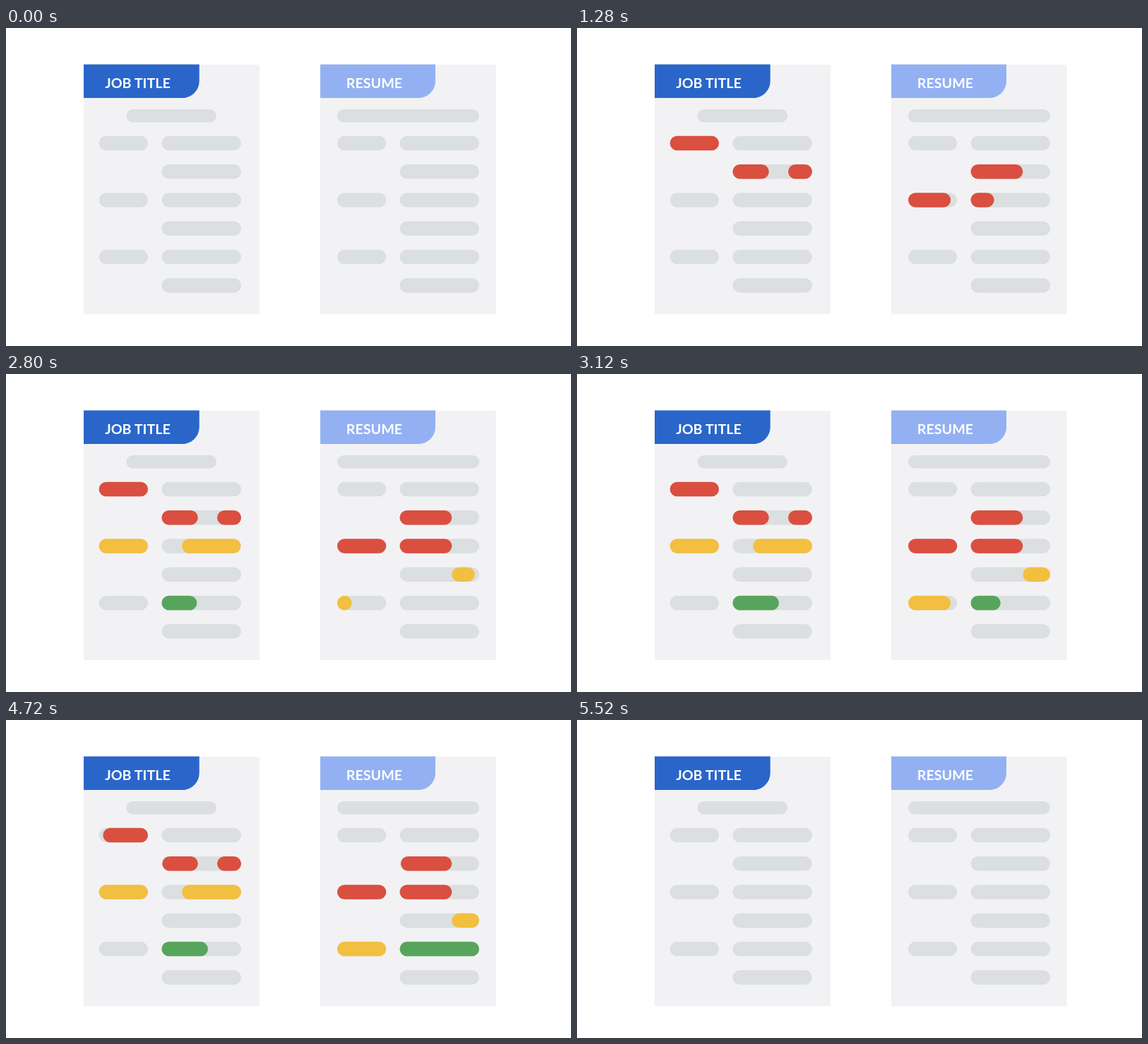
These frames come from a looping animation (800x450 px, 5760 ms). An HTML page:

```html
<!DOCTYPE html>
<html lang="en">
<head>
<meta charset="utf-8">
<title>Job title and resume</title>
<style>
  html, body { margin: 0; width: 100%; height: 100%; overflow: hidden; background: #fff; }
  svg { display: block; width: 100%; height: 100%; }
  text { font: 700 19.7px Lato, "Open Sans", sans-serif; fill: #fff; text-anchor: middle; }
</style>
</head>
<body>
<svg id="stage" viewBox="0 0 800 450"></svg>
<script>
const LOOP = 5760, STEP = 80;
const ROW_TOP = 152.7, ROW_GAP = 40.25, BAR_H = 20.6;
const GREY = '#dbdfe0', RED = '#da4f40', YELLOW = '#f3bf41', GREEN = '#57a55d';
const ENTER_GAP = 240, ENTER_TIME = 530, EXIT_START = 4560, EXIT_TIME = 465;
const FIRST = 240, SECOND = 2080;

// left, right, row, colour, phase start, entry order, exit order
const marks = [
  [131.6, 201, 0, RED, FIRST, 0, 0],
  [220.4, 271.8, 1, RED, FIRST, 1, 1],
  [299, 333, 1, RED, FIRST, 2, 2],
  [557.5, 631.3, 1, RED, FIRST, 2, 1],
  [469, 538.3, 2, RED, FIRST, 3, 2],
  [557.5, 631.3, 2, RED, FIRST, 4, 3],
  [131.6, 201, 2, YELLOW, SECOND, 0, 3],
  [249.2, 333, 2, YELLOW, SECOND, 1, 4],
  [220.4, 286, 4, GREEN, SECOND, 2, 5],
  [631.3, 670, 3, YELLOW, SECOND, 2, 4],
  [469, 538.3, 4, YELLOW, SECOND, 3, 5],
  [557.5, 670, 4, GREEN, SECOND, 4, 6]
];

const rowY = row => ROW_TOP + row * ROW_GAP;

const pill = (x1, x2, y, h, fill) =>
  `<rect x="${x1}" y="${y}" width="${x2 - x1}" height="${h}" rx="${h / 2}" fill="${fill}"/>`;

function sheet(x, width, tabWidth, tabColour, title, titleX, head, small, big) {
  let s = `<rect x="${x}" y="52" width="${width}" height="353" fill="#f2f2f4"/>`;
  s += `<path d="M${x} 51.5h${tabWidth}v23.5a24 24 0 0 1-24 24h${24 - tabWidth}z" fill="${tabColour}"/>`;
  s += `<text x="${titleX}" y="84.7">${title}</text>`;
  s += pill(...head, 115, 18.5, GREY);
  for (let row = 0; row < 6; row++) {
    if (row % 2 === 0) s += pill(...small, rowY(row), BAR_H, GREY);
    s += pill(...big, rowY(row), BAR_H, GREY);
  }
  return s;
}

const stage = document.getElementById('stage');
stage.innerHTML =
  sheet(110, 249, 163.7, '#2a66ca', 'JOB TITLE', 186.5, [170.4, 298], [131.6, 201], [220.4, 333]) +
  sheet(445, 248.5, 163, '#93b1f2', 'RESUME', 521.5, [469, 670], [469, 538.3], [557.5, 670]) +
  '<g id="marks">' +
  marks.map(([x1, x2, row, colour]) => pill(x1, x2, rowY(row), BAR_H, colour)).join('') +
  '</g>';
const rects = document.getElementById('marks').children;

const clamp = v => Math.min(1, Math.max(0, v));

function draw(time) {
  const t = Math.floor((time % LOOP) / STEP) * STEP;
  marks.forEach(([x1, x2, , , base, order, exit], i) => {
    const start = base + order * ENTER_GAP;
    const grow = Math.sin(clamp((t - start) / ENTER_TIME) * Math.PI / 2);
    const leave = clamp((t - EXIT_START - exit * STEP) / EXIT_TIME) ** 2;
    // later marks show as a dot one step before they grow
    const shown = t >= start + (order ? -STEP : STEP) && leave < 1;
    const run = x2 - x1 - BAR_H;
    rects[i].setAttribute('visibility', shown ? 'visible' : 'hidden');
    rects[i].setAttribute('x', x1 + run * leave);
    rects[i].setAttribute('width', BAR_H + run * Math.max(0, grow - leave));
  });
}

const origin = performance.now();
function tick() {
  draw(performance.now() - origin);
  requestAnimationFrame(tick);
}
tick();
</script>
</body>
</html>
```
